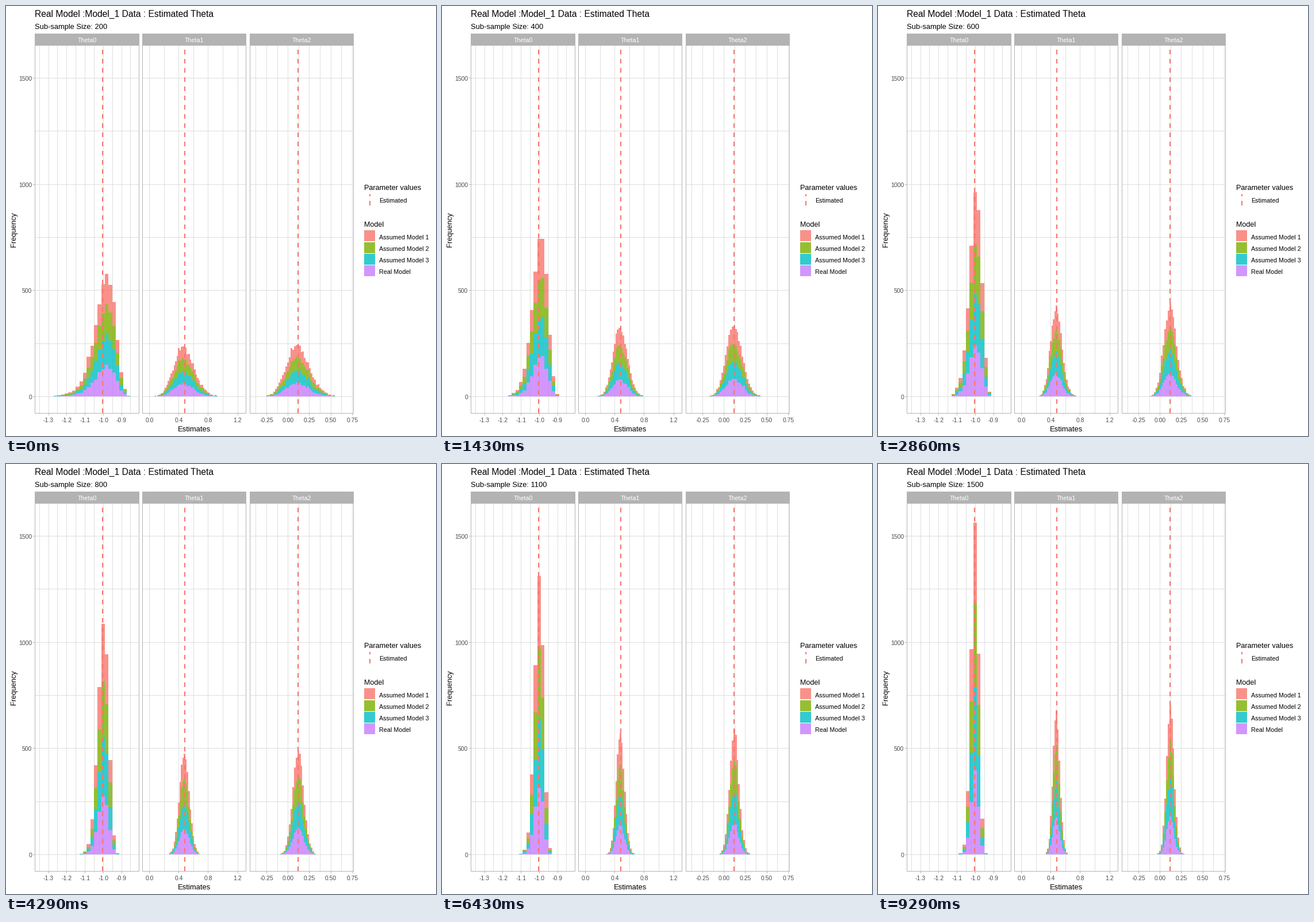
A matplotlib script for the animation above (10000 ms loop, 748 px wide and 748 px high).

```python
import math

import numpy as np
import matplotlib.pyplot as plt
from matplotlib.animation import FuncAnimation
from matplotlib.collections import PolyCollection
from matplotlib.patches import Rectangle

SIZE, DPI = 748, 64
SIZES = range(200, 1600, 100)
Y0, Y_UNIT = 679, 0.3693          # pixel row of zero, pixels per count
TOP, BOTTOM = 68, 708
BIN, DRAWS, DASH = 0.02, 4000, 8
GRID, BORDER, TICK = "#dedede", "#b3b3b3", "#4d4d4d"
RED, GREEN, TEAL, PURPLE = "#f8766d", "#7cae00", "#00bfc4", "#c77cff"
LEGEND = [("Assumed Model 1", RED), ("Assumed Model 2", GREEN),
          ("Assumed Model 3", TEAL), ("Real Model", PURPLE)]

# x axis: left edge, x of zero, pixels per unit, tick range, step, label format
# spread: variance = scale / n - floor, skew shrinks with the root of n
PANELS = [
    dict(name="Theta0", left=50, zero=486.3, unit=317.5, lo=-1.3, hi=-0.9,
         step=0.1, half=(-1, 9), fmt="%.1f", line=167,
         mean=-1.0028, drift=0.9, scale=0.776, floor=0.00012, skew=-4),
    dict(name="Theta1", left=237, zero=249.4, unit=127.6, lo=0, hi=1.2,
         step=0.4, half=(0, 6), fmt="%.1f", line=310,
         mean=0.477, drift=0, scale=3.9, floor=0.0004, skew=0.8),
    dict(name="Theta2", left=424, zero=490.2, unit=148.8, lo=-0.25, hi=0.75,
         step=0.25, half=(-1, 8), fmt="%.2f", line=507,
         mean=0.123, drift=0, scale=3.7, floor=0.0004, skew=0.8),
]

fig = plt.figure(figsize=(SIZE / DPI, SIZE / DPI), dpi=DPI, facecolor="white")
ax = fig.add_axes([0, 0, 1, 1])
ax.set_xlim(0, SIZE)
ax.set_ylim(SIZE, 0)
ax.axis("off")


def rect(x0, y0, x1, y1, color, z=1, alpha=1):
    ax.add_patch(Rectangle((x0, y0), x1 - x0, y1 - y0, fc=color, lw=0,
                           alpha=alpha, antialiased=False, zorder=z))


def label(x, y, s, px, color="black", ha="left", va="baseline", **kw):
    return ax.text(x, y, s, fontsize=px * 72 / DPI, color=color, ha=ha, va=va,
                   family="Liberation Sans", zorder=6, **kw)


def row(count):
    return round(Y0 - count * Y_UNIT)


def dashes(x, top, bottom):
    for y in range(bottom, top, -2 * DASH):
        rect(x, max(top, y - DASH), x + 2, y, RED, z=4)


def draw_panel(p):
    left, right = p["left"], p["left"] + (181 if p["left"] == 50 else 180)
    for k in range(p["half"][0], p["half"][1] + 1):
        v = p["lo"] + k * p["step"] / 2
        pos = p["zero"] + v * p["unit"]
        x = round(pos)
        rect(x, TOP, x + 1, BOTTOM, GRID)
        if k % 2 == 0:
            rect(x, BOTTOM + 1, x + 1, BOTTOM + 4, BORDER)
            label(pos + 0.4, 724, p["fmt"] % (round(v, 2) + 0.0), 10.4, TICK,
                  "center")
    for count in range(0, 1501, 250):
        rect(left, row(count), right, row(count) + 1, GRID)
    dashes(p["line"], TOP, BOTTOM)
    for x in (left, right):
        rect(x, TOP, x + 1, BOTTOM + 1, BORDER, z=5)
    rect(left, BOTTOM, right + 1, BOTTOM + 1, BORDER, z=5)
    rect(left, 48, right + 1, TOP + 1, BORDER, z=5)
    label((left + right + 1) / 2, 63, p["name"], 10.6, "white", "center")


def draw_legend():
    label(623, 319.5, "Parameter values", 12.65)
    dashes(632, 327, 347)
    label(649, 341.5, "Estimated", 10.75)
    label(623, 383.5, "Model", 12.65)
    for i, (name, color) in enumerate(LEGEND):
        y = round(390.5 + 20.2 * i)
        rect(623, y, 642, y + 19, color, alpha=0.8)
        label(649, 405.5 + 20.2 * i, name, 10.75)


def skewed_cdf(t, s):
    """Standardised log-normal distribution; a negative s leans left."""
    a = abs(s)
    mid = math.exp(a * a / 2)
    u = mid + math.copysign(1, s) * t * mid * math.sqrt(math.expm1(a * a))
    if u <= 0:
        return 0.0
    return (1 + math.erf(math.log(u) / a / math.sqrt(2))) / 2


def stacks(p, n):
    """Bin edges and the five stacked levels of each bin."""
    rng = np.random.default_rng(n)
    mean = p["mean"] + p["drift"] / n
    sd = math.sqrt(p["scale"] / n - p["floor"])
    center = round(mean / BIN)
    edges = (np.arange(center - 30, center + 31) - 0.5) * BIN
    cdf = [skewed_cdf((e - mean) / sd, p["skew"] / math.sqrt(n)) for e in edges]
    total = DRAWS * np.abs(np.diff(cdf))
    total += 0.5 * np.sqrt(total) * rng.normal(size=len(total))
    total = np.where(total < 2.5, 0, total)
    noise = rng.normal(size=(4, len(total)))
    noise -= noise.mean(axis=0)
    parts = np.clip(total / 4 + 0.5 * np.sqrt(total / 4) * noise, 0, None)
    return edges, np.vstack([0 * total, np.cumsum(parts, axis=0)])


for panel in PANELS:
    draw_panel(panel)
for count in range(0, 1501, 500):
    rect(47, row(count), 50, row(count) + 1, BORDER)
    label(45, row(count) + 4.5, str(count), 10.4, TICK, "right")
label(50, 19, "Real Model :Model_1 Data : Estimated Theta", 15.6)
label(327.5, 740, "Estimates", 13, ha="center")
label(14, 389, "Frequency", 12.8, ha="center", va="center", rotation=90)
draw_legend()
subtitle = label(50, 39.5, "", 12.85)

bars = []
for _, color in reversed(LEGEND):
    bars.append(PolyCollection([], facecolors=color, edgecolors="none",
                               linewidths=0, alpha=0.8, antialiaseds=False,
                               zorder=3))
    ax.add_collection(bars[-1], autolim=False)


def update(i):
    n = SIZES[i]
    subtitle.set_text(f"Sub-sample Size: {n}")
    verts = [[] for _ in bars]
    for p in PANELS:
        edges, levels = stacks(p, n)
        xs = np.round(p["zero"] + edges * p["unit"])
        for x0, x1, col in zip(xs, xs[1:], levels.T):
            ys = [row(c) for c in col]
            for v, lo, hi in zip(verts, ys, ys[1:]):
                if hi < lo:
                    v.append([(x0, lo), (x1, lo), (x1, hi), (x0, hi)])
    for coll, v in zip(bars, verts):
        coll.set_verts(v)
    return [subtitle, *bars]


anim = FuncAnimation(fig, update, frames=len(SIZES),
                     interval=10000 / len(SIZES), repeat=True, repeat_delay=0)
plt.show()
```
